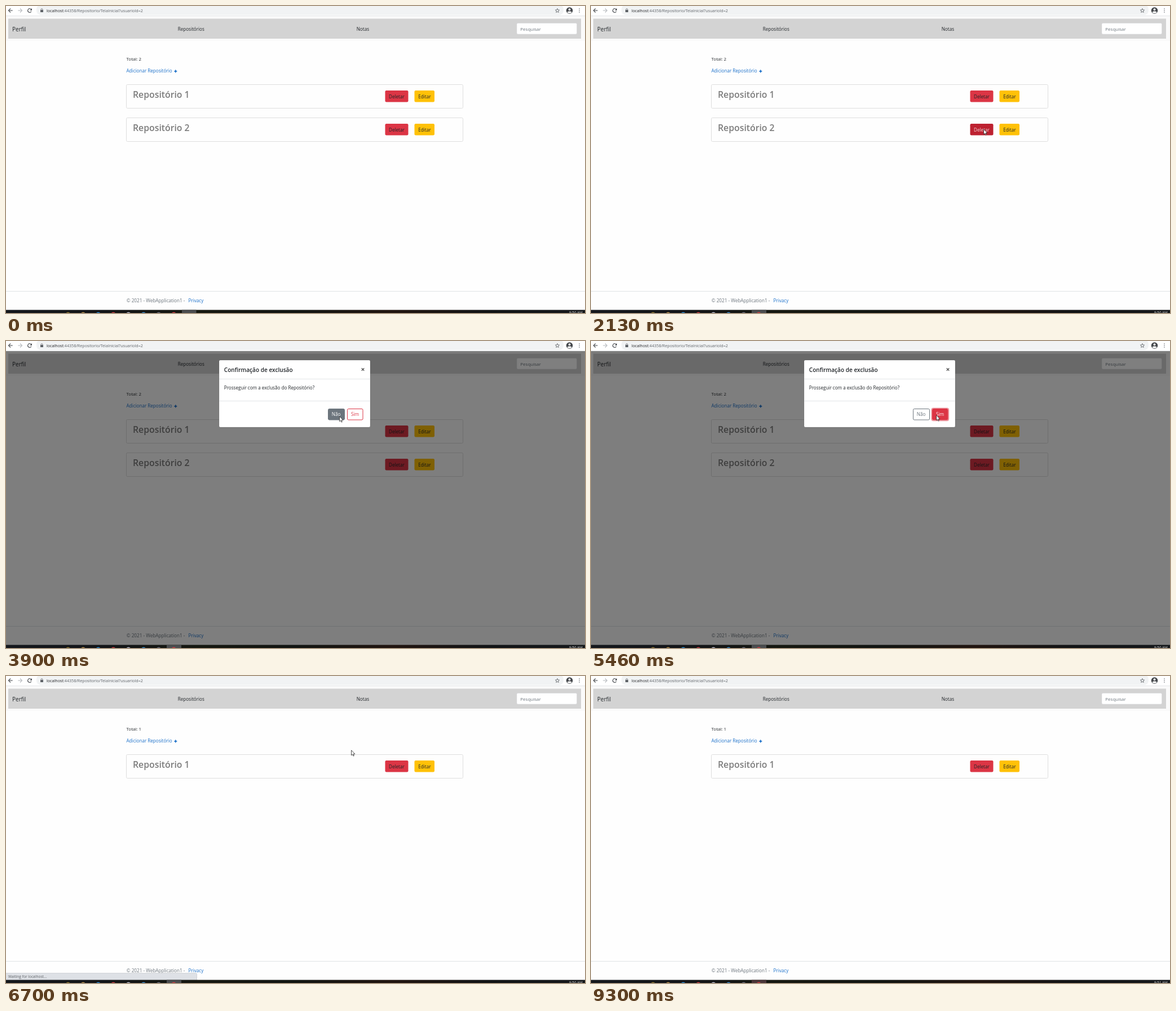
An HTML page with a canvas for the animation above (9350 ms loop, 1027x545 px).

```html
<!DOCTYPE html>
<html lang="pt">
<head>
<meta charset="utf-8">
<style>
html, body { margin: 0; width: 100%; height: 100%; overflow: hidden; background: #fff; }
canvas { display: block; }
</style>
</head>
<body>
<canvas id="stage" width="1027" height="545"></canvas>
<script>
const ctx = document.getElementById('stage').getContext('2d');
const W = 1027, H = 545, LOOP = 9350, TAU = Math.PI * 2;
const INK = '#212529', RED = '#dc3545', GREY = '#6c757d', LINK = '#1a6fc9', ICON = '#5f6368';
const MODAL_OPEN = 2220, MODAL_CLOSE = 5550, RELOAD = 6480, LOADED = 6700;

// Pointer moves: start and end time, number of steps, from, to, easing.
const linear = p => p;
const easeOut = p => 1 - (1 - p) ** 2;
const easeIn = p => p ** 1.9;
const smooth = p => p * p * (3 - 2 * p);
const moves = [
  [430, 1340, 13, [1024, 545], [700, 230], easeOut],
  [1420, 1750, 5, [700, 230], [696, 218], linear],
  [2660, 3520, 12, [696, 218], [597, 134], smooth],
  [3900, 4060, 3, [597, 134], [580, 131], linear],
  [4270, 4760, 7, [580, 131], [612, 131], smooth],
  [7950, 8570, 9, [612, 131], [1006, 546], easeIn]
];

function pointerAt(t) {
  let pos = null;
  for (const [start, end, steps, from, to, ease] of moves) {
    if (t < start) break;
    const step = Math.min(steps - 1, Math.floor((t - start) / (end - start) * (steps - 1) + 1e-6));
    const k = ease((step + 1) / steps);
    pos = from.map((v, i) => Math.round(v + (to[i] - v) * k));
  }
  return pos;
}

function text(str, x, y, size = 8.1, color = INK, weight = 400) {
  ctx.font = `${weight} ${size}px "Open Sans", "Noto Sans", sans-serif`;
  ctx.fillStyle = color;
  ctx.fillText(str, x, y);
}

function fill(x, y, w, h, color) {
  ctx.fillStyle = color;
  ctx.fillRect(x, y, w, h);
}

function box(x, y, w, h, r, color, border, width = 1) {
  ctx.beginPath();
  ctx.roundRect(x, y, w, h, r);
  if (color) { ctx.fillStyle = color; ctx.fill(); }
  if (border) { ctx.strokeStyle = border; ctx.lineWidth = width; ctx.stroke(); }
}

function line(color, width, ...pts) {
  ctx.beginPath();
  pts.forEach(([x, y]) => ctx.lineTo(x, y));
  ctx.strokeStyle = color;
  ctx.lineWidth = width;
  ctx.stroke();
}

function disc(x, y, r, color) {
  ctx.beginPath();
  ctx.arc(x, y, r, 0, TAU);
  ctx.fillStyle = color;
  ctx.fill();
}

function cross(x, y, r, color, width) {
  line(color, width, [x - r, y - r], [x + r, y + r]);
  line(color, width, [x - r, y + r], [x + r, y - r]);
}

const inside = (p, x, y, w, h) => p && p[0] >= x && p[0] < x + w && p[1] >= y && p[1] < y + h;

function drawToolbar(loading) {
  fill(0, 0, W, 18, '#fff');
  box(54, -2, 935, 18, 8, '#f1f3f4');
  fill(0, 17, W, 1, '#e4e6e8');
  for (const [x, dir, color] of [[8, 1, '#4a4d51'], [25, -1, '#b9bcc0']]) {
    line(color, 1.1, [x + 3.7 * dir, 8], [x - 3.5 * dir, 8]);
    line(color, 1.1, [x, 4.5], [x - 3.5 * dir, 8], [x, 11.5]);
  }
  if (loading) {
    cross(42, 8, 2.9, '#4a4d51', 1.1);
  } else {
    ctx.beginPath();
    ctx.arc(42, 8, 3.3, 0.5, TAU - 0.7);
    ctx.strokeStyle = '#4a4d51';
    ctx.lineWidth = 1.1;
    ctx.stroke();
    ctx.beginPath();
    ctx.moveTo(46, 4);
    ctx.lineTo(46, 7.7);
    ctx.lineTo(42.4, 7.7);
    ctx.fillStyle = '#4a4d51';
    ctx.fill();
  }
  fill(61, 7, 5, 4, ICON);
  box(62, 4.7, 3, 4, 1.5, null, ICON, 0.8);
  text('localhost', 72, 10.6, 7.15, '#202124');
  const hostWidth = ctx.measureText('localhost').width;
  text(':44358/Repositorio/TelaInicial?usuarioId=2', 72 + hostWidth, 10.6, 7.15, ICON);

  ctx.beginPath();
  for (let i = 0; i < 10; i++) {
    const a = i * Math.PI / 5 - Math.PI / 2, r = i % 2 ? 1.7 : 3.8;
    ctx.lineTo(978 + r * Math.cos(a), 8.3 + r * Math.sin(a));
  }
  ctx.closePath();
  ctx.strokeStyle = '#55585c';
  ctx.lineWidth = 0.8;
  ctx.stroke();

  disc(999.5, 8, 5.8, '#45484c');
  disc(999.5, 6.2, 1.9, '#fff');
  ctx.beginPath();
  ctx.ellipse(999.5, 11, 3.6, 1.8, 0, 0, TAU);
  ctx.fill();
  for (const y of [5, 8, 11]) disc(1017, y, 0.8, ICON);
}

function drawCard(name, y, hot, pressed) {
  box(213.5, y + 0.5, 597, 42, 2, '#fefefe', '#dedede');
  text(name, 225, y + 24, 15.8, '#7c7c7c', 600);
  box(672.5, y + 11, 41, 20.5, 2.2, pressed ? '#bd2130' : hot ? '#c82333' : RED);
  text('Deletar', 679, y + 24.5, 8.1, hot ? '#f3d5d8' : INK);
  box(724.5, y + 11, 35.5, 20.5, 2.2, '#ffc107');
  text('Editar', 731.3, y + 24.5);
}

function drawPage(t, pointer) {
  fill(0, 18, W, 522, '#fefefe');
  fill(0, 18, W, 44, '#fafafa');
  fill(4, 22.5, 1016, 35.5, '#d3d3d3');
  text('Perfil', 11, 44.5, 10);
  text('Repositórios', 304.7, 43.6);
  text('Notas', 621.7, 43.6, 8.2);
  box(906, 30.5, 106.5, 19.5, 2, '#fff', '#d8dbde', 0.6);
  text('Pesquisar', 912.3, 43.6, 8, GREY);

  const loaded = t >= LOADED;
  text(`Total: ${loaded ? 1 : 2}`, 213.5, 96.6, 7.95);
  text('Adicionar Repositório', 213.5, 118.2, 8.1, LINK);
  fill(298.3, 115, 5, 1.6, LINK);
  fill(300, 113.3, 1.6, 5, LINK);

  drawCard('Repositório 1', 139, false, false);
  if (!loaded) {
    const hot = t < 2300 && inside(pointer, 672, 209, 41, 21);
    drawCard('Repositório 2', 198, hot, hot && t >= 2040);
  }
  fill(0, 506, W, 1, '#e0e3e6');
  text('© 2021 - WebApplication1 -', 213.7, 526.2, 8.2, GREY);
  text('Privacy', 323.5, 526.2, 8.1, LINK);
}

function drawOutlineButton(label, x, w, color, hot, textX) {
  box(x + 0.5, 120.5, w - 1, 19.5, 2, hot ? color : '#fff', color);
  text(label, textX, 133.4, 8.2, hot ? '#fff' : color);
}

function drawModal(t, pointer) {
  fill(0, 18, W, 522, 'rgba(0,0,0,.5)');
  box(378, 34, 268, 119, 2, '#fff', 'rgba(0,0,0,.2)', 0.6);
  text('Confirmação de exclusão', 386.8, 54.6, 10.1, INK, 600);
  cross(633, 50.5, 2.3, '#555', 1.3);
  fill(378, 67, 268, 1, '#e2e5e8');
  text('Prosseguir com a exclusão do Repositório?', 386.8, 86);
  fill(378, 106, 268, 1, '#e2e5e8');
  drawOutlineButton('Não', 571, 30, GREY, inside(pointer, 571, 120, 30, 21), 577.8);
  if (t >= 5310) box(604.3, 119.3, 30, 22, 3, null, 'rgba(220,53,69,.5)', 1.8);
  drawOutlineButton('Sim', 605, 28.5, RED, inside(pointer, 605, 120, 28, 21), 612);
}

function drawStatus(t) {
  if (t < RELOAD || t >= 7170) return;
  ctx.globalAlpha = t < 7010 ? 1 : t < 7090 ? 0.66 : 0.33;
  box(-2, 527.5, 340.5, 14, [0, 2, 0, 0], '#dee1e6', '#c9ccd1', 0.8);
  text('Waiting for localhost...', 4, 536, 6.6, ICON);
  ctx.globalAlpha = 1;
}

function drawTaskbar(t) {
  const tint = ctx.createLinearGradient(0, 0, W, 0);
  ['#14171c', '#121417', '#15170f', '#111411', '#21140f', '#111315', '#15181b']
    .forEach((c, i, all) => tint.addColorStop(i / (all.length - 1), c));
  fill(0, 539.5, W, 6, tint);
  if (t < 2040) fill(312, 539.5, 25.5, 6, '#4a4c4e');
  else fill(285, 539.5, 26, 6, t < 9300 ? '#4a4c4e' : '#493538');
  ['#8a7430', '#b08a4a', '#2a8ad0', '#c83a40', '#b8b8c8', '#3a8ac8', '#6a6a78', '#d03a40']
    .forEach((c, i) => disc(110 + i * 26.8, 548, 4.6, c));
  text(t < 9200 ? '9:50 AM' : '9:51 AM', 999, 547, 6.3, '#e8e8e8');
}

function drawPointer([x, y]) {
  const shape = [[0, 0], [0, 9], [2, 7.2], [3.4, 10.3], [4.8, 9.7], [3.5, 6.7], [6.2, 6.5]];
  ctx.beginPath();
  shape.forEach(([dx, dy]) => ctx.lineTo(x + 0.6 + dx, y + 0.8 + dy));
  ctx.closePath();
  ctx.fillStyle = '#fff';
  ctx.fill();
  ctx.strokeStyle = '#222';
  ctx.lineWidth = 0.8;
  ctx.stroke();
}

function draw(t) {
  const pointer = pointerAt(t);
  drawToolbar(t >= RELOAD && t < LOADED);
  drawPage(t, pointer);
  if (t >= MODAL_OPEN && t < MODAL_CLOSE) drawModal(t, pointer);
  drawStatus(t);
  drawTaskbar(t);
  if (pointer && pointer[1] < H) drawPointer(pointer);
}

const began = performance.now();
function tick() {
  draw((performance.now() - began) % LOOP);
  requestAnimationFrame(tick);
}
tick();
</script>
</body>
</html>
```
